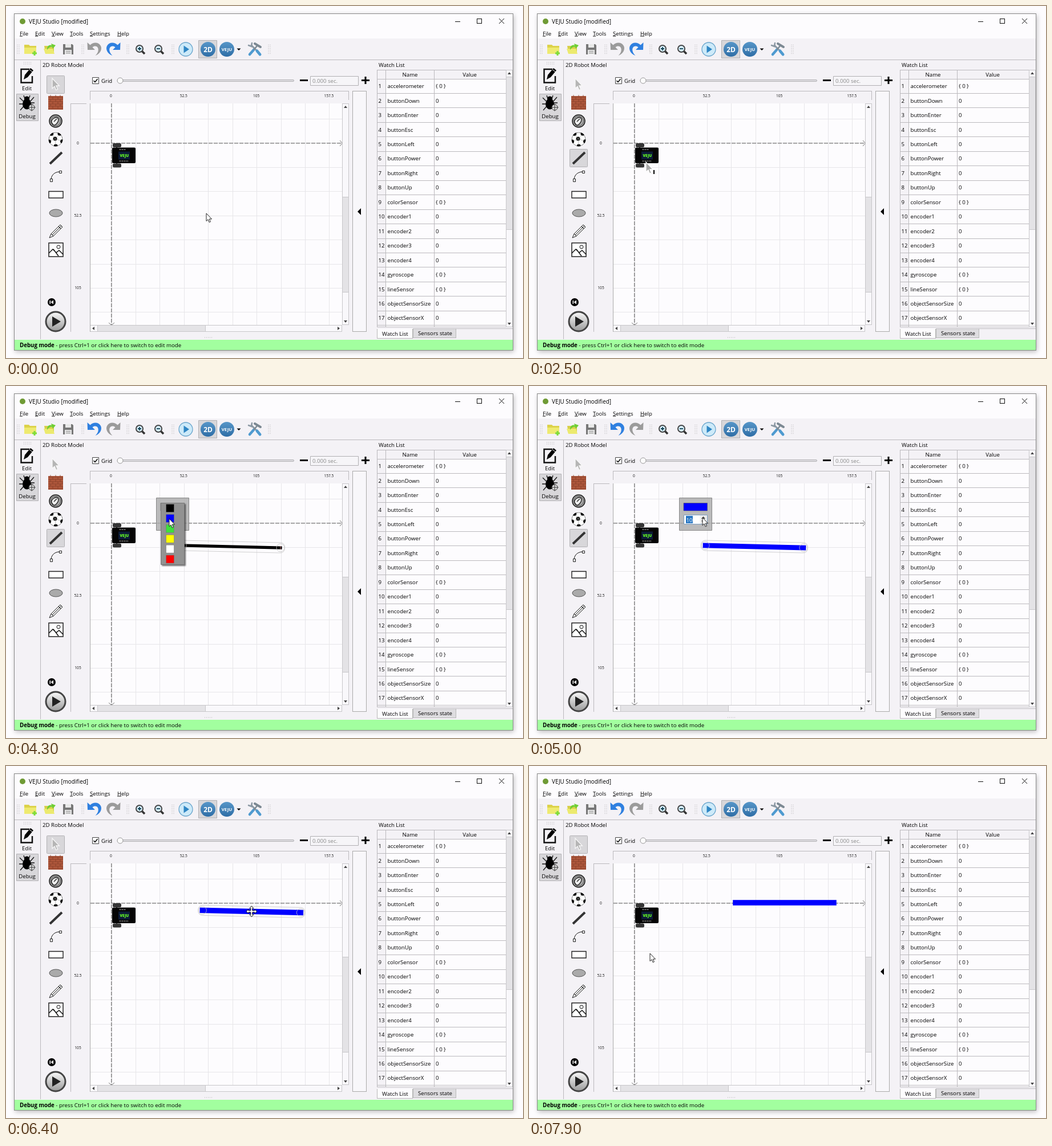
An HTML page for the animation above (8000 ms loop, 906 px wide and 618 px high).

```html
<!DOCTYPE html>
<html lang="en">
<head>
<meta charset="utf-8">
<title>VEJU Studio</title>
<style>
  html, body { margin: 0; width: 100%; height: 100%; overflow: hidden; background: #fdfcfe; }
  svg { display: block; }
  text { font: 9.6px "Open Sans", "Noto Sans", sans-serif; fill: #000; white-space: pre; }
  .mid { text-anchor: middle; }
  .ruler text { font-size: 6.6px; fill: #111; text-anchor: middle; }
  .window { filter: drop-shadow(1px 2px 4px #0004); }
  .sharp { shape-rendering: crispEdges; }
  .box { fill: #d8d7da; stroke: #b2b1b4; }
  .edge { fill: none; stroke: #bbb9bd; }
  .ink { fill: none; stroke: #111; }
  .badge { fill: #fff; font-weight: 700; text-anchor: middle; }
</style>
</head>
<body>
<svg id="stage" width="906" height="618" viewBox="0 0 906 618">
  <defs>
    <path id="arrow" d="M0 0V13.6L3.1 10.8 5.2 15.8 7.4 14.8 5.3 10H9.5Z"/>
    <path id="bend" d="M142.500 64L143 77H156L151.500 72.500C157 68 163 72 161.500 79 160.500 83 158.500 85 156.500 87 165 84 169 76 166 70 162 63 153 63 147.500 68.500Z"/>
    <linearGradient id="steel" x2="0" y2="1"><stop stop-color="#fafafa"/><stop offset="1" stop-color="#9a9a9a"/></linearGradient>
    <linearGradient id="sky" x2="0" y2="1"><stop stop-color="#5796c8"/><stop offset="1" stop-color="#2f6ea6"/></linearGradient>
    <clipPath id="view"><path d="M148 171H589V560H148Z"/></clipPath>
    <clipPath id="ballEdge"><circle cx="87" cy="234" r="12.500"/></clipPath>
  </defs>

  <!-- window -->
  <g class="sharp">
    <path class="window" fill="#f4f2f6" d="M15 14H889V605H15Z"/>
    <path fill="#fdfcfe" d="M15 14H889V57H15Z"/>
    <path fill="#a2ff9f" d="M15 586H889V605H15Z"/>
    <path class="edge" d="M15 94.500H889M60.500 95V585"/>
    <path fill="none" stroke="#888" d="M14.500 13.500H888.500V604.500H14.500Z"/>
  </g>
  <circle cx="29" cy="27" r="5" fill="#6f9a35"/>
  <text x="40" y="30.500" style="font-size:9.900px">VEJU Studio [modified]</text>
  <g class="ink">
    <path class="sharp" d="M787 27.500H796M825.500 22.500H833.500V30.500H825.500Z"/>
    <path d="M864 22L873 31M873 22L864 31"/>
  </g>
  <g id="menu"></g>

  <!-- toolbar -->
  <g id="grips" stroke="#c6c5c8" stroke-width="1.500" stroke-dasharray="1 2"></g>
  <path fill="#dcd24a" d="M32 68H40L42 70H53V84H32Z"/><path fill="#eeea70" d="M32 73H53V84H32Z"/>
  <path stroke="#7fdc3a" stroke-width="3" d="M50 79V87M46 83H54"/>
  <path fill="#d6cf48" d="M67 70H75L77 72H84V83H69Z"/><path fill="#ecea6e" d="M66 75H82L85 84H69Z"/>
  <path fill="#6fce35" d="M72 77C71 70 77 67 80 69L79 66 87 69 82 75 81 72C77 71 75 73 72 77Z"/>
  <path fill="#777" d="M100 67H116L118 69V85H100Z"/><path fill="#e8e8e8" d="M104 67H114V73H104ZM103 77H115V85H103Z"/>
  <path stroke="#888" d="M105 79.500H113M105 82.500H113"/>
  <use href="#bend" id="undo"/><use href="#bend" id="redo" transform="matrix(-1 0 0 1 343 0)"/>
  <g id="zoom"></g>
  <circle cx="315" cy="76" r="12" fill="#cdeaf9" stroke="#6aa5cc" stroke-width="1.300"/>
  <path fill="#2f86c4" d="M311.500 69.500L321 76 311.500 82.500Z"/>
  <path class="box" d="M337.500 60.500H369.500V91.500H337.500Z"/>
  <circle cx="354" cy="76" r="13" fill="url(#sky)"/><text class="badge" x="354" y="80.500" style="font-size:12px">2D</text>
  <circle cx="387" cy="76" r="13" fill="url(#sky)"/><text class="badge" x="387" y="79" style="font-size:7.8px">VEJU</text>
  <path d="M404.500 74.500H411.500L408 78Z"/>
  <g stroke-linecap="round" fill="none">
    <path stroke="#8b98a3" stroke-width="3" d="M430 69L439 78"/>
    <path stroke="#8b98a3" stroke-width="2.500" d="M425 69L430 71 431 65"/>
    <path stroke="#4f9bd0" stroke-width="5" d="M440 79L445 85"/>
    <path stroke="#4f9bd0" stroke-width="4.500" d="M427 85L434 77"/>
    <path stroke="#7c8993" stroke-width="4" d="M436 66L446 72"/>
    <path stroke="#7c8993" stroke-width="2.500" d="M435 76L440 70"/>
  </g>

  <!-- modes -->
  <path class="box" d="M18.500 154.500H56.500V201.500H18.500Z"/>
  <path fill="none" stroke="#111" stroke-width="2.500" d="M41 111H26.500V134.500H46V123"/>
  <path d="M31 129L33 121 43 109 48 113 38 125Z"/><path stroke="#fff" d="M41 111.500L46 115.500"/>
  <text class="mid" x="36.500" y="148">Edit</text>
  <g class="ink" stroke-width="1.300"><path d="M24 161L30 167M49 160L43 167M23 172H30M50 170H43M25 183L31 176M33 163L31 157M40 163L42 157"/></g>
  <ellipse cx="36.500" cy="172" rx="7.500" ry="9.500"/><circle cx="36.500" cy="163" r="4.500"/>
  <circle cx="45" cy="178" r="5" fill="#ddd" stroke="#333"/><path stroke="#333" d="M38.500 178H51.500M45 171.500V184.500"/>
  <text class="mid" x="37" y="197">Debug</text>

  <!-- palette -->
  <text x="64" y="107">2D Robot Model</text>
  <rect id="tool" class="box" x="71.500" width="31" height="31" rx="1"/>
  <use href="#arrow" transform="translate(81 127) scale(1.300)" fill="#b5b5b5" stroke="#f7f7f7"/>
  <path fill="#b0583c" d="M74 158H100V182H74Z"/><g id="bricks" stroke="#7d3a28" fill="none"></g>
  <circle cx="87" cy="202" r="11" fill="#aaa" stroke="#222" stroke-width="1.600"/><circle cx="87" cy="202" r="8.500" fill="none" stroke="#555"/>
  <path fill="#eee" stroke="#222" stroke-width="1.400" d="M80 205C78 199 88 193 91 197S88 210 83 209ZM84 203L89 198"/>
  <g id="ball" clip-path="url(#ballEdge)"></g>
  <path stroke="#333" stroke-width="4" d="M77 277L98 257"/>
  <path class="ink" d="M79 304C80 295 87 291 95 291"/><path fill="#fff" stroke="#222" d="M77.500 303.500H81.500V308.500H77.500ZM93.500 289.500H97.500V293.500H93.500Z"/>
  <path fill="#fff" stroke="#222" stroke-width="1.400" d="M75 325.500H100V337H75Z"/>
  <ellipse cx="87.500" cy="363.500" rx="11.500" ry="6.500" fill="#aaa" stroke="#555"/>
  <path fill="#eee" stroke="#222" d="M76 407L79 400 95 384 99 388 83 404ZM79 400L83 404M81 402L97 386M92 387L96 391"/>
  <path fill="#fff" stroke="#222" stroke-width="1.500" d="M75 416H100V440H75Z"/>
  <path class="ink" stroke-width="1.500" d="M75 434L82 427 88 433 93 429 100 436M83 427L92 439"/><circle class="ink" cx="92" cy="423" r="3"/>
  <circle cx="80" cy="520" r="7"/><path fill="#fff" d="M76.500 517H78V523H76.500ZM83 516.500V523.500L78.500 520Z"/>
  <circle cx="87" cy="554" r="17" fill="url(#steel)" stroke="#444" stroke-width="3"/><path fill="#222" d="M81 545L96 554 81 563Z"/>

  <!-- model controls -->
  <path fill="#fff" stroke="#444" d="M151.500 125.500H162.500V136.500H151.500Z"/><path class="ink" stroke-width="1.600" d="M153.500 131L156 133.500 160.500 128"/>
  <text x="167" y="135">Grid</text>
  <rect x="195.500" y="129.500" width="309" height="3" rx="1.500" fill="#dddce0" stroke="#b4b3b6"/><circle cx="200" cy="131" r="5" fill="#fcfcfc" stroke="#999"/>
  <path stroke="#000" stroke-width="3" d="M515 130.500H529M623 130.500H637M630 124V137"/>
  <path fill="#f6f5f8" stroke="#b0afb2" d="M533.500 123.500H617.500V139.500H533.500Z"/><text x="537" y="135" style="fill:#888">0.000 sec.</text>
  <path class="edge sharp" d="M147.500 165V149.500H600.500V165M113.500 572V171.500H141"/>
  <g class="ruler" id="ruler"></g>

  <!-- scene -->
  <path fill="#fdfcfe" d="M147 171H589V560H147Z"/>
  <g id="grid" class="sharp" stroke="#e7e6e9"></g>
  <path fill="none" stroke="#777" stroke-width="1.300" stroke-dasharray="7 2" d="M148 240.800H588M184.800 171V560"/>
  <path fill="none" stroke="#777" d="M585 236L589.500 240.800 585 246M180 556L184.800 560.500 190 556"/>
  <g fill="#353535"><rect x="187" y="241" width="15" height="7" rx="2.500"/><rect x="187" y="276.500" width="15" height="7" rx="2.500"/></g>
  <path stroke="#333" stroke-width="2" d="M194 247V278"/>
  <rect x="186" y="248.500" width="41" height="27.500" rx="2" fill="#050505"/>
  <path stroke="#666" stroke-width="2" stroke-dasharray="3 1" d="M198.500 252H210M198.500 272.300H215"/>
  <path fill="#0c1a38" d="M197 255.500H217V269.500H197Z"/><text class="badge" x="207.300" y="264.700" style="font-size:6.500px;font-weight:800;fill:#6f2">VEJU</text>
  <g clip-path="url(#view)"><g id="item">
    <rect id="stroke"/>
    <g id="handles" fill="none" stroke="#c5c5c5" stroke-width=".8">
      <rect id="halo" x="-7.500" y="-9" height="18" rx="7.500"/>
      <circle r="7"/><circle id="tip" r="7"/>
      <path id="marks" stroke="#d88"/>
    </g>
  </g></g>
  <g id="panel">
    <path fill="#aaaaaacc" stroke="#888" d="M263.500 196.500H320.500V253.500H263.500Z"/>
    <path id="swatch" stroke="#555" stroke-width=".6" d="M271 205.500H312.500V219H271Z"/>
    <path fill="#fff" stroke="#7a9dc0" d="M271.500 226.500H312.500V242.500H271.500Z"/>
    <path fill="#eee" d="M299.500 227H312V242H299.500Z"/><path d="M302 233L305.500 229 309 233ZM302 236.500L305.500 240.500 309 236.500Z" fill="#444"/>
    <rect id="mark" x="275" y="228" width="12" height="13" fill="#2676c4"/><text id="size" x="275.500" y="238.500"></text>
  </g>
  <g id="drop">
    <path fill="#929292" stroke="#777" style="filter:drop-shadow(2px 2px 1px #0008)" d="M271.500 205.500H312.500V313.500H271.500Z"/>
  </g>
  <g id="bars" class="sharp"></g>
  <path fill="#f8f7fa" stroke="#aaa" class="sharp" d="M607.500 149.500H631.500V571.500H607.500Z"/><path d="M622 355V367L616 361Z"/>

  <!-- watch list -->
  <text x="653" y="107">Watch List</text>
  <g class="sharp">
    <path fill="#fdfcfe" d="M665 128H876V563H665Z"/>
    <path class="edge" id="lines"/>
  </g>
  <text class="mid" x="708" y="123.500">Name</text><text class="mid" x="812.500" y="123.500">Value</text>
  <g id="rows"></g>
  <g class="sharp">
    <path fill="#dedde0" stroke="#b8b8b8" d="M713.500 566.500H788.500V582.500H713.500Z"/>
    <path fill="#fdfcfe" stroke="#b8b8b8" d="M712.500 566.500V583.500H650.500V566.500"/>
    <path class="edge" d="M713 566.500H888"/>
  </g>
  <text x="659" y="579">Watch List</text><text x="722" y="578">Sensors state</text>
  <text x="24" y="599" style="font-size:9.7px"><tspan font-weight="700">Debug mode</tspan> - press Ctrl+1 or click here to switch to edit mode</text>

  <g id="cursor">
    <use id="plain" href="#arrow" fill="#fff" stroke="#222"/>
    <g id="pen"><use href="#arrow" transform="scale(1.280)" fill="#aaa" stroke="#fff"/><path d="M13 14H15V21H13Z"/></g>
    <path id="move" fill="#fff" stroke="#111" stroke-linejoin="round" d="M0-9.500L3.500-5.500H1.500V-1.500H5.500V-3.500L9.500 0 5.500 3.500V1.500H1.500V5.500H3.500L0 9.500-3.500 5.500H-1.500V1.500H-5.500V3.500L-9.500 0-5.500-3.500V-1.500H-1.500V-5.500H-3.500Z"/>
  </g>
</svg>
<script>
const $ = id => document.getElementById(id);
const add = (id, html) => $(id).insertAdjacentHTML('beforeend', html);
const set = (id, attrs) => { for (const k in attrs) $(id).setAttribute(k, attrs[k]); };
const show = (id, on) => { $(id).style.display = on ? '' : 'none'; };
const label = (x, y, s, cls = '') => `<text x="${x}" y="${y}" class="${cls}">${s}</text>`;
const path = (d, more = '') => `<path d="${d}" ${more}/>`;

[['File', 24], ['Edit', 51], ['View', 80], ['Tools', 112], ['Settings', 147], ['Help', 195]].forEach(([s, x]) =>
  add('menu', label(x, 51.5, `<tspan text-decoration="underline">${s[0]}</tspan>${s.slice(1)}`)));

for (const x of [20, 23, 133, 136, 212, 215, 291, 294, 460, 463]) add('grips', path(`M${x} 68V84`));
for (const [x, y] of [[31, 99], [31, 102], [348, 582]]) add('grips', path(`M${x} ${y}h13`));

[[234, 'v6m-3 -3h6'], [267, 'm-3 3h6']].forEach(([x, sign]) => add('zoom',
  path(`M${x + 4} 79l5 5`, 'stroke="#333" stroke-width="3.500"') +
  `<circle cx="${x}" cy="75" r="6" fill="#d5ecf8" stroke="#444" stroke-width="2"/>` +
  path(`M${x} 72${sign}`, 'fill="none" stroke="#145" stroke-width="1.800"')));

for (let i = 0; i < 6; i++)
  add('bricks', path(`M74 ${160 + i * 4}H100M${78 + i % 2 * 4} ${156 + i * 4}v4m9 -4v4m8 -4v4`, 'stroke-width=".7"'));

const spot = (x, y, r) => `<circle cx="${x}" cy="${y}" r="${r}"/>`;
let patches = '<circle cx="87" cy="234" r="12" fill="#fff" stroke="#777"/>' + spot(86, 233, 3.5);
for (let i = 0; i < 5; i++) {
  const a = i * Math.PI * 0.4 + 0.3, c = Math.cos(a), s = Math.sin(a);
  patches += spot(87 + 12 * c, 234 + 12 * s, 3.4) + path(`M86 233L${87 + 10 * c} ${234 + 10 * s}`, 'stroke="#999" stroke-width=".6"');
}
add('ball', patches);

['0', '52.5', '105', '157.5'].forEach((s, i) => {
  add('ruler', label(184 + i * 127.3, 159.5, s));
  if (i < 3) add('ruler', label(126, 242.7 + i * 127.3, s));
});
const CELL = 42.43;
for (let i = 0; i < 10; i++) {
  const x = Math.floor(185 + i * CELL) + .5, y = Math.floor(198.5 + i * CELL) + .5;
  add('grid', path(`M${x} 171V560` + (i < 9 ? `M148 ${y}H589` : '')));
}

// scroll bar: track box, thumb range along the long side
function bar(x, y, w, h, from, to) {
  const tall = h > w, cx = x + w / 2, cy = y + h / 2;
  const rect = (a, b, c, d, fill) => `<rect x="${a + .5}" y="${b + .5}" width="${c - 1}" height="${d - 1}" fill="${fill}" stroke="#c8c7ca"/>`;
  const tri = d => path(d, 'fill="#444" shape-rendering="auto"');
  add('bars', rect(x, y, w, h, '#f9f8fb') +
    (tall ? rect(x, from, w, to - from, '#e4e3e6') + tri(`M${cx - 3} ${y + 8}h6l-3 -4z`) + tri(`M${cx - 3} ${y + h - 8}h6l-3 4z`)
          : rect(from, y, to - from, h, '#e4e3e6') + tri(`M${x + 8} ${cy - 3}v6l-4 -3z`) + tri(`M${x + w - 8} ${cy - 3}v6l4 -3z`)));
}
bar(589, 171, 12, 389, 335, 503);
bar(147, 560, 442, 12, 160, 350);
bar(876, 112, 12, 452, 124, 393);
add('bars', path('M147.5 171V572', 'stroke="#aaa"'));

const names = ('accelerometer buttonDown buttonEnter buttonEsc buttonLeft buttonPower buttonRight buttonUp colorSensor ' +
  'encoder1 encoder2 encoder3 encoder4 gyroscope lineSensor objectSensorSize objectSensorX').split(' ');
let rules = 'M650.5 112V563.500H876M650 112.500H876M665.500 112V563M750.500 112V563M650 128.500H876';
names.forEach((s, i) => {
  const y = 144.2 + i * 25.45;
  const list = /^(acc|color|gyro|line)/.test(s);
  add('rows', label(652.5, y, i + 1) + label(668.5, y, s) + label(753, y, list ? '{ 0 }' : '0'));
  rules += `M650 ${Math.floor(153.5 + i * 25.45) + .5}H876`;
});
set('lines', { d: rules });

['#000', '#00f', '#3ce03c', '#ff0', '#fff', '#f00'].forEach((c, i) =>
  add('drop', `<rect x="280.5" y="${207.5 + i * 17.9}" width="14" height="14" fill="${c}" stroke="#777" stroke-width=".6"/>`));

// [time, x, y]
const route = [
  [900, 351, 364], [1100, 318, 345], [1300, 190, 292], [1500, 104, 264], [1700, 90, 268],
  [2300, 90, 268], [2500, 205, 274], [2700, 309, 280], [2800, 325, 280], [3000, 430, 283], [3100, 464, 284], [3200, 481, 284],
  [3300, 481, 284], [3600, 320, 222], [3800, 288, 212], [4200, 288, 212], [4300, 286, 233], [4400, 286, 233],
  [4600, 304, 231], [5100, 304, 231], [5600, 87, 138], [5800, 135, 174], [6100, 395, 282], [6200, 395, 282],
  [6500, 448, 242], [6800, 534, 242], [6900, 534, 242], [7200, 534, 240], [7300, 534, 240], [7800, 212, 329]
];
function along(t) {
  const i = route.findIndex(p => p[0] > t);
  if (i < 0) return route.at(-1).slice(1);
  if (!i) return route[0].slice(1);
  const [t0, x0, y0] = route[i - 1], [t1, x1, y1] = route[i], k = (t - t0) / (t1 - t0);
  return [x0 + (x1 - x0) * k, y0 + (y1 - y0) * k];
}
const ramp = (t, a, b) => Math.min(1, Math.max(0, (t - a) / (b - a)));

function draw(t) {
  const [x, y] = along(t);
  const lineTool = t >= 1700 && t < 5600;
  const done = t >= 3300, panel = done && t < 6200, blue = t >= 4400;
  set('tool', { y: lineTool ? 251.5 : 122.5 });
  set('undo', { fill: done ? '#2f80e0' : '#9b9b9b' });
  set('redo', { fill: done ? '#9b9b9b' : '#2f80e0' });

  show('item', t >= 2700);
  const end = t < 3200 ? Math.max(310, x + 1) : 481;
  const shift = ramp(t, 6200, 6500);
  const ax = 309 + 53 * shift, ay = 280 - 40 * shift;
  const dx = end - 309, dy = 4 * Math.min(1, dx / 150) * (1 - ramp(t, 6900, 7200));
  const len = Math.hypot(dx, dy), size = 6 + Math.min(5, Math.max(0, Math.floor((t - 4600) / 100)));
  const w = size * .87;
  set('item', { transform: `translate(${ax} ${ay}) rotate(${Math.atan2(dy, dx) * 180 / Math.PI})` });
  set('stroke', { x: -w / 2, y: -w / 2, width: len + w, height: w, fill: blue ? '#00f' : '#000' });
  set('halo', { width: len + 15 });
  set('tip', { cx: len });
  set('marks', { d: `M0 -3V3M${len} -3V3`, opacity: blue ? 0 : 1 });
  show('handles', t < 7800);

  show('panel', panel);
  show('drop', t >= 3800 && t < 4400);
  set('swatch', { fill: blue ? '#00f' : '#000' });
  $('size').textContent = size;
  $('size').style.fill = size > 6 ? '#fff' : '#111';
  show('mark', size > 6);

  const overPanel = panel && x > 263 && x < 321 && y > 196 && y < 254;
  const pen = lineTool && x > 147 && !overPanel, move = t >= 6100 && t < 7400;
  set('cursor', { transform: `translate(${x} ${y})` });
  show('pen', pen);
  show('move', move);
  show('plain', !pen && !move);
}

function tick() {
  draw(Math.floor(performance.now() % 8000 / 100 + 1e-6) * 100);
  requestAnimationFrame(tick);
}
tick();
</script>
</body>
</html>
```
